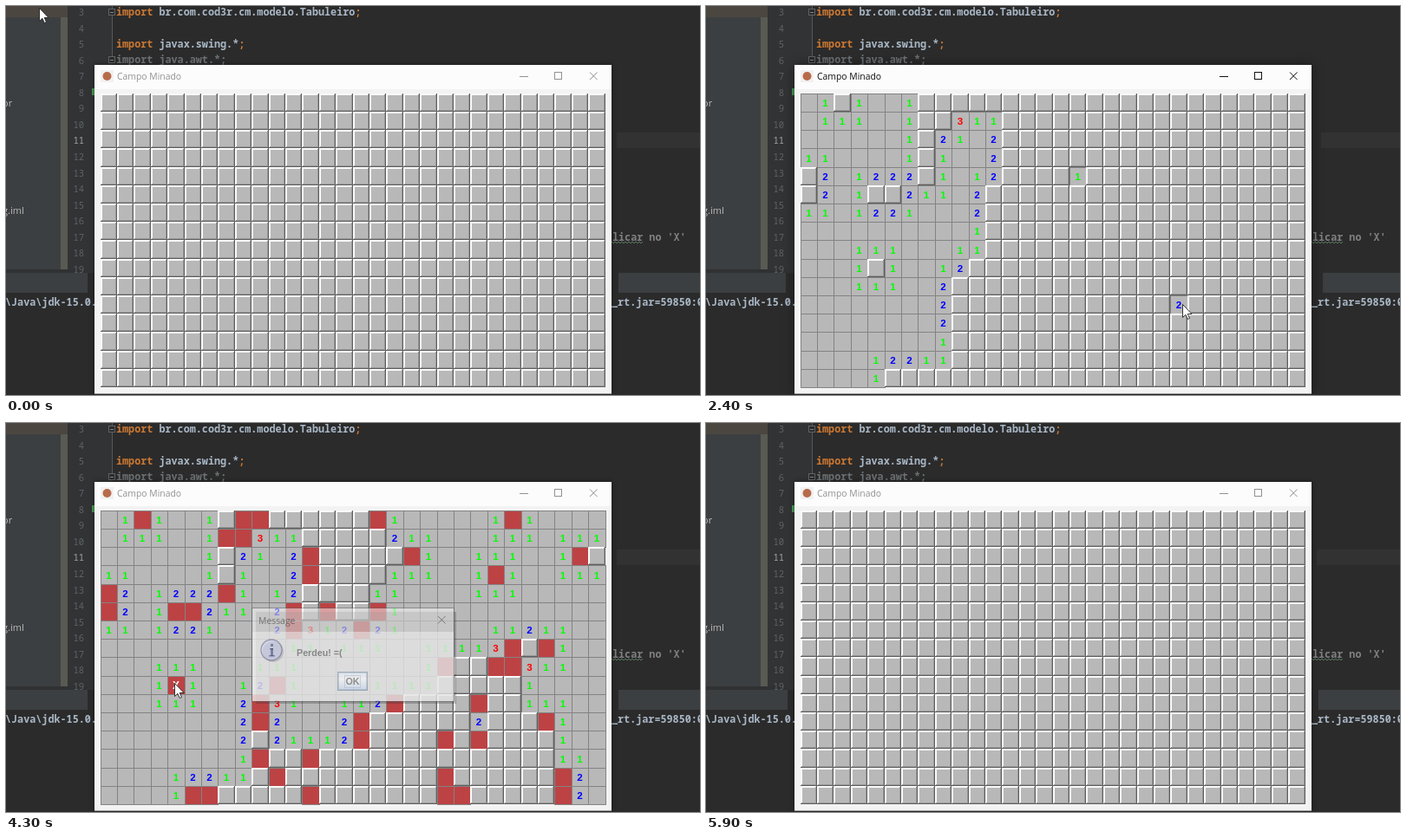
These frames come from a looping animation (800x449 px, 6 s). An HTML page with a canvas:

```html
<!DOCTYPE html>
<html lang="pt">
<head>
<meta charset="utf-8">
<title>Campo Minado</title>
<style>
html, body { margin: 0; width: 100%; height: 100%; overflow: hidden; background: #2b2b2b; }
canvas { display: block; width: 100vw; height: 100vh; }
</style>
</head>
<body>
<canvas id="stage" width="800" height="449"></canvas>
<script>
const ctx = document.getElementById('stage').getContext('2d');
const LOOP = 6000, STEP = 100;
const COLS = 30, ROWS = 16;
const BOARD = { x: 109, y: 101.3, cellW: 19.4, cellH: 21.2 };
const MONO = '"Noto Sans Mono", "DejaVu Sans Mono", monospace';
const UI = '"Open Sans", sans-serif';
const SANS = '"Liberation Sans", sans-serif';
const DIGITS = ['', '#00ff00', '#0000ff', '#ff0000'];

// Mine columns, row by row
const mines = [
  '2 8 9 16 24', '7 8', '12 18 28', '12 23', '0 7', '0 4 5 11 13 16', '11 15', '24 26',
  '20 23 24', '4 10', '9 17 22', '9 15 26', '15 20 22', '9 12', '10 20 27', '5 6 12 20 21 27'
].map(row => new Set(row.split(' ').map(Number)));

// Clicks as [time, column, row]
const clicks = [[700, 2, 4], [1500, 16, 4], [2400, 22, 11], [3300, 28, 9], [4200, 4, 9]];
const LOST = 4200, DIALOG = 4300, RESET = 5100, BLUR = 5600;

// Pointer path as [time, x, y]
const path = [
  [0, 38, 2], [200, 18, 24], [400, 70, 85], [600, 152, 188], [800, 158, 194],
  [1200, 405, 190], [1400, 428, 200], [1700, 428, 200], [2300, 549, 344], [2400, 549, 344],
  [2900, 655, 307], [3000, 655, 307], [3100, 655, 304], [3300, 655, 304], [3600, 268, 276],
  [3700, 262, 282], [3800, 262, 282], [4100, 194, 300], [4300, 194, 300], [4600, 366, 277],
  [4800, 366, 277], [5000, 398, 297], [5100, 398, 297], [5300, 133, 90], [5500, 44, 12],
  [5700, 12, 2], [5800, 2, -24], [6000, 2, -24]
];

function neighbours(c, r) {
  const list = [];
  for (let y = Math.max(0, r - 1); y <= Math.min(ROWS - 1, r + 1); y++)
    for (let x = Math.max(0, c - 1); x <= Math.min(COLS - 1, c + 1); x++)
      if (x !== c || y !== r) list.push([x, y]);
  return list;
}

const counts = mines.map((_, r) => Array.from({ length: COLS }, (_, c) =>
  neighbours(c, r).filter(([x, y]) => mines[y].has(x)).length));

// Time at which each cell opens
const openAt = counts.map(row => row.map(() => Infinity));
for (const [time, col, row] of clicks) {
  const queue = [[col, row]];
  while (queue.length) {
    const [c, r] = queue.pop();
    if (openAt[r][c] < Infinity) continue;
    openAt[r][c] = time;
    if (!counts[r][c] && !mines[r].has(c)) queue.push(...neighbours(c, r));
  }
}

function rect(x, y, w, h, color) {
  ctx.fillStyle = color;
  ctx.fillRect(x, y, w, h);
}

function frame(x, y, w, h, color) {
  ctx.strokeStyle = color;
  ctx.lineWidth = 1;
  ctx.strokeRect(x + .5, y + .5, w - 1, h - 1);
}

function text(str, x, y, font, color, align = 'left') {
  ctx.font = font;
  ctx.fillStyle = color;
  ctx.textAlign = align;
  ctx.textBaseline = 'alphabetic';
  ctx.fillText(str, x, y);
}

function line(points, color, width = 1) {
  ctx.strokeStyle = color;
  ctx.lineWidth = width;
  ctx.beginPath();
  points.forEach(([x, y]) => ctx.lineTo(x, y));
  ctx.stroke();
}

function cross(x, y, size, color) {
  line([[x, y], [x + size, y + size]], color);
  line([[x + size, y], [x, y + size]], color);
}

function code(parts, x, y) {
  const font = '600 11.78px ' + MONO;
  for (const [str, color] of parts) {
    text(str, x, y, font, color);
    x += ctx.measureText(str).width;
  }
}

function drawEditor(focused) {
  const plain = '#a9b7c6', key = '#cc7832';
  rect(0, 0, 800, 449, '#2b2b2b');
  rect(0, 0, 63, 304, '#3c3f41');
  rect(63, 0, 8, 304, '#595a52');
  rect(0, 0, 71, 13, '#4b4640');
  rect(71, 0, 51, 308, '#313335');
  rect(0, 304, 94, 4, '#2f3133');
  rect(0, 308, focused ? 92 : 94, 23, '#3c3f41');
  const band = focused ? 709 : 704;
  rect(band, 146, 800 - band, 18, '#323232');
  rect(band + 2, 308, 798 - band, 23, '#3c3f41');

  for (let n = 3; n <= 19; n++)
    text(n, 90, 11 + (n - 3) * 18.55, '10.5px ' + MONO, n === 11 ? '#a4a3a3' : '#606366', 'right');
  line([[122.5, 0], [122.5, 66]], '#55585a');
  for (const y of [3, 58]) {
    rect(118, y, 8, 8, '#2b2b2b');
    frame(118, y, 8, 8, '#606366');
    rect(120, y + 4, 4, 1, '#808385');
  }
  code([['import ', key], ['br.com.cod3r.cm.modelo.Tabuleiro', plain], [';', key]], 127, 11);
  code([['import ', key], ['javax.swing.*', plain], [';', key]], 127, 48);
  code([['import java.awt.*;', '#6c7073']], 127, 66);
  rect(99, 95, 3, 8, '#499c54');
  text('or', -4, 116, '11px ' + UI, '#bbbbbb');
  text('g.iml', -4, 240, '11px ' + UI, '#bbbbbb');

  code([["licar no 'X'", '#808080']], 699, 271);
  line(Array.from({ length: 19 }, (_, i) => [698 + i * 2, 272 + i % 2 * 2]), '#5a7a5e');
  code([['\\Java\\jdk-15.0.', plain]], -1, 346);
  code([['_rt.jar=59850:0', plain]], 698, 346);
}

function drawCell(c, r, t) {
  const left = i => Math.floor(BOARD.x + i * BOARD.cellW + .01);
  const top = i => Math.floor(BOARD.y + i * BOARD.cellH);
  const x = left(c), y = top(r);
  const w = left(c + 1) - x, h = top(r + 1) - y;
  const mx = x + w / 2, my = y + h / 2 + 4.5;
  const running = t < RESET;
  const blown = running && t >= LOST && mines[r].has(c);

  if (blown || running && t >= openAt[r][c]) {
    rect(x, y, w, h, blown ? '#bd4244' : '#b8b8b8');
    frame(x, y, w + 1, h + 1, '#838383');
    if (blown) {
      if (openAt[r][c] <= t) text('X', mx, my, 'bold 12px ' + SANS, '#ffffff', 'center');
    } else if (counts[r][c]) {
      text(counts[r][c], mx, my, 'bold 11.6px ' + SANS, DIGITS[counts[r][c]], 'center');
    }
    return;
  }
  rect(x, y, w, h, '#b8b8b8');
  rect(x, y, w, 2, '#fafafa');
  rect(x, y, 2, h, '#fafafa');
  rect(x + 1, y + h - 2, w - 1, 1, '#999999');
  rect(x + w - 2, y + 1, 1, h - 1, '#999999');
  rect(x, y + h - 1, w, 1, '#5f5f5f');
  rect(x + w - 1, y, 1, h, '#5f5f5f');
}

function drawWindow(t, focused) {
  const ink = focused ? '#111111' : '#929292';
  ctx.save();
  ctx.shadowColor = 'rgba(0,0,0,.45)';
  ctx.shadowBlur = focused ? 12 : 6;
  rect(102, 68, 596, 379.6, '#f3f3f3');
  ctx.restore();
  rect(102, 68, 596, 28, '#fcfcfc');
  rect(109, 74, 15, 14, '#f1f1f1');
  ctx.fillStyle = '#b76b4b';
  ctx.beginPath();
  ctx.arc(116.5, 81, 5, 0, Math.PI * 2);
  ctx.fill();
  text('Campo Minado', 128, 85, '10.4px ' + UI, ink);
  rect(592, 81, 10, 1, ink);
  frame(632, 76, 9, 9, ink);
  cross(673, 76.5, 8.5, ink);
  for (let r = 0; r < ROWS; r++)
    for (let c = 0; c < COLS; c++) drawCell(c, r, t);
}

function drawDialog(t) {
  const closing = Math.max(0, (t - RESET) / 235);
  if (t < DIALOG || closing >= 1) return;
  const opening = Math.min(1, .5 + (t - DIALOG) / 200);
  const scale = 1 - closing * .035;
  ctx.save();
  ctx.globalAlpha = opening * (1 - closing);
  ctx.translate(400, 267.5);
  ctx.scale(scale, scale);
  ctx.translate(-400, -267.5);

  rect(288, 218, 231, 106, 'rgba(50,50,50,.55)');
  rect(284, 214, 232, 107, '#fbfbfb');
  rect(284, 241, 232, 80, '#f2f2f2');
  frame(283, 213, 234, 109, '#5c6064');
  text('Message', 291, 232, '10.4px ' + UI, '#222222');
  cross(498, 223, 8.5, '#333333');

  for (const [dx, color] of [[2, '#a5a5ac'], [0, '#c9cdf0']]) {
    ctx.fillStyle = color;
    ctx.beginPath();
    ctx.arc(306 + dx, 262 + dx, 12, 0, Math.PI * 2);
    ctx.fill();
  }
  ctx.strokeStyle = '#555a7c';
  ctx.lineWidth = 1.3;
  ctx.stroke();
  rect(305, 255, 3, 3, '#343a68');
  rect(304, 260, 4, 1.5, '#343a68');
  rect(305, 260, 3, 9, '#343a68');
  rect(303, 268, 7, 1.5, '#343a68');

  text('Perdeu! =(', 335, 269, 'bold 10.7px ' + SANS, '#333333');
  const shade = ctx.createLinearGradient(0, 287, 0, 309);
  shade.addColorStop(0, '#dfe9f4');
  shade.addColorStop(.4, '#ffffff');
  shade.addColorStop(1, '#b4c9e8');
  rect(382, 287, 35, 22, shade);
  frame(382, 287, 35, 22, '#66788a');
  frame(383, 288, 33, 20, '#9db0c4');
  frame(390, 291, 19, 15, '#9fb6d4');
  text('OK', 399.5, 302, 'bold 10.7px ' + SANS, '#333333', 'center');
  ctx.restore();
}

function pointer(t) {
  const i = path.findIndex(p => p[0] > t);
  const [t0, x0, y0] = path[i - 1], [t1, x1, y1] = path[i];
  const k = (t - t0) / (t1 - t0);
  return [x0 + (x1 - x0) * k, y0 + (y1 - y0) * k];
}

function drawPointer(t) {
  const [x, y] = pointer(t);
  ctx.save();
  ctx.translate(x + .5, y + .5);
  ctx.beginPath();
  for (const [px, py] of [[0, 0], [0, 15], [3.4, 11.8], [5.8, 17], [8, 16], [5.7, 11], [10.5, 11]])
    ctx.lineTo(px, py);
  ctx.closePath();
  ctx.fillStyle = '#ffffff';
  ctx.fill();
  ctx.strokeStyle = '#222222';
  ctx.lineWidth = .9;
  ctx.stroke();
  ctx.restore();
}

function draw(now) {
  const t = Math.floor(now % LOOP / STEP) * STEP;
  const focused = t >= clicks[0][0] && t < DIALOG || t >= RESET && t < BLUR;
  drawEditor(focused);
  drawWindow(t, focused);
  drawDialog(t);
  drawPointer(t);
}

const start = performance.now();
function tick() {
  draw(performance.now() - start);
  requestAnimationFrame(tick);
}
tick();
</script>
</body>
</html>
```
